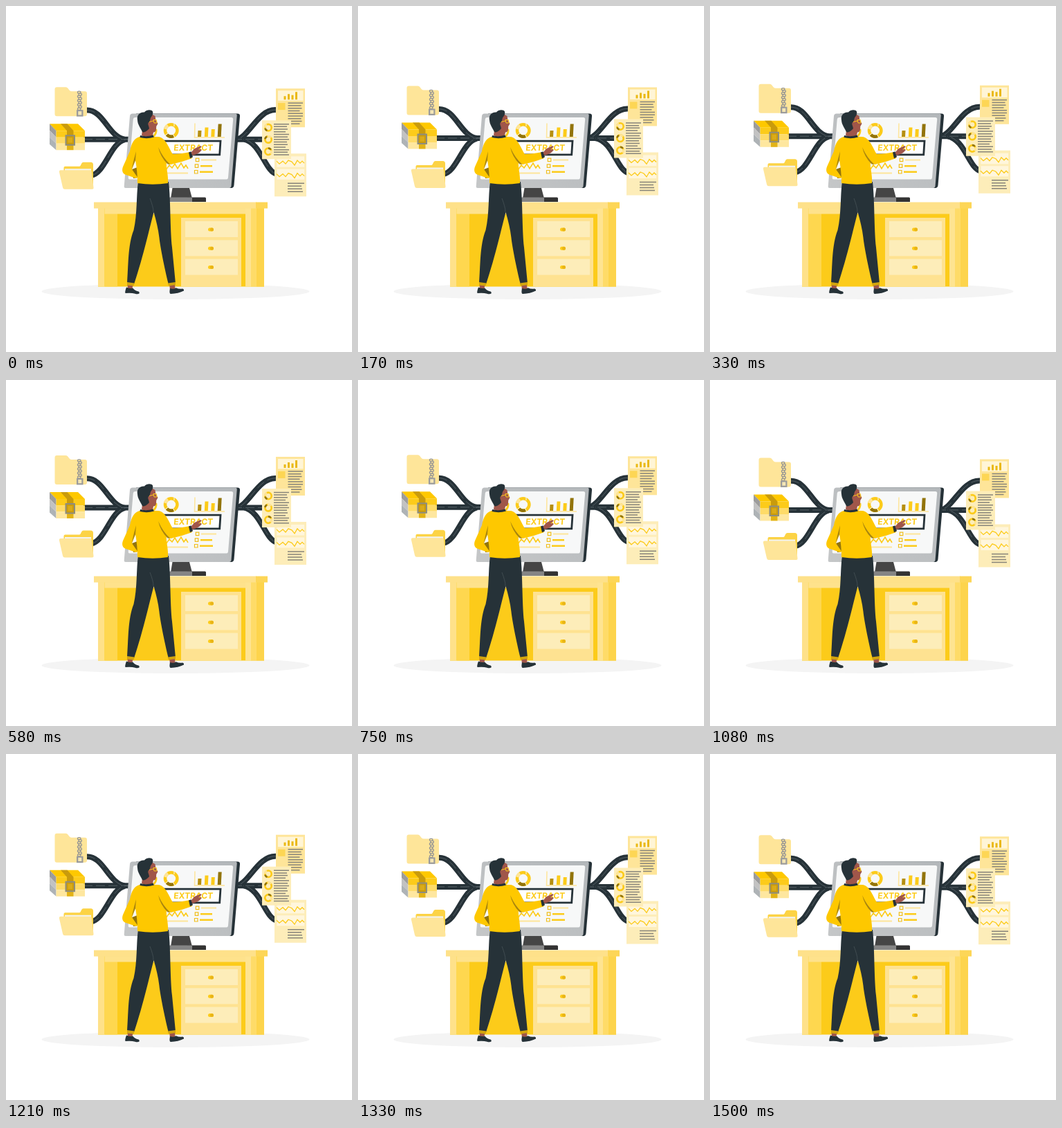
Recreate the animation shown at these times as an HTML page. Size 500x500 px, loop 1.54 s.

```html
<!DOCTYPE html>
<html lang="en">
<head>
<meta charset="utf-8">
<title>Extract</title>
<style>
html, body { margin: 0; width: 100%; height: 100%; overflow: hidden; background: #fff; }
svg { display: block; width: 100vw; height: 100vh; }
.ink { fill: #263238; }
.sun { fill: #fccb1a; }
.knit { fill: #fec800; }
.skin { fill: #a0564a; }
.pale { fill: #fee599; }
.cream { fill: #fdedb9; }
.line { fill: none; stroke: #fccb1a; stroke-width: 1.6; }
.cables { fill: none; stroke: #263238; stroke-width: 8; }
.shine { fill: none; stroke: #667177; stroke-width: .7; stroke-dasharray: 13 5; }
.text { stroke: #86847a; stroke-width: 1.5; fill: none; }
</style>
</head>
<body>
<svg viewBox="0 0 500 500">
  <defs>
    <linearGradient id="metal" x1="1" y1="0" x2="0" y2="1">
      <stop offset="0" stop-color="#b3b7ba"/><stop offset="1" stop-color="#c5c7c8"/>
    </linearGradient>
    <path id="wires" d="M116 150.500C141 149 148 190 172 192.500H180M112 192.500H180M123 244.500C143 242 151 197 172 193M390 150C364 149 351 190 333 192.500M328 192.500H372M392 243C374 240 369 197 343 192.500"/>
  </defs>

  <ellipse cx="245" cy="412.5" rx="193.5" ry="11.5" fill="#f4f4f4"/>

  <g id="float">
    <use href="#wires" class="cables"/>
    <use href="#wires" class="shine"/>

    <!-- zipped folder -->
    <path class="pale" d="M70.500 120q0-3 3-3H86c5 0 4 6 9 6h19q3 0 3 3v30q0 3-3 3H73.500q-3 0-3-3z"/>
    <g id="zip" fill="none" stroke="#949494" stroke-width="1.2"></g>
    <path fill="#9b9b9b" d="M102 150h9.500v9.500h-9.500z"/>
    <path fill="#f4e6b5" d="M104.300 152h5v5.300h-5z"/>

    <!-- parcel -->
    <path class="knit" d="M63 170h41l10 10H72.500z"/>
    <path fill="#9c9c9c" d="M63 170l9.500 10v9.500L63 179.500z"/>
    <path fill="#c2c2c2" d="M63 179.500l9.500 10v9L63 189.500z"/>
    <path fill="#aeb3b6" d="M63 189.500l9.500 9v9.500L63 199.500z"/>
    <path class="sun" d="M72.500 180H114v9.500H72.500z"/>
    <path fill="#fedb68" d="M72.500 189.500H114v9H72.500z"/>
    <path fill="#fee79f" d="M72.500 198.500H114v9.500H72.500z"/>
    <path fill="#c99b0c" d="M79 170h9.500l9 10v9.500H88V180z"/>
    <path fill="#e2b316" d="M88 189.500h9.500V208H88z"/>
    <path fill="#c99b0c" stroke="#8d8d80" stroke-width="2" d="M86.500 187h12.500v13.500H86.500z"/>
    <path fill="#dbab17" d="M89.500 190h6.500v7.500h-6.500z"/>

    <!-- open folder -->
    <path fill="#fcd345" d="M83.500 233.500q0-2 2-2H106c3 0 2-6 6-6h10.500q3.500 0 3.500 3.500V262H83.500z"/>
    <path fill="#f3f3f0" d="M85 235h38V255H85z"/>
    <path class="pale" d="M79 237H121.500q2 0 2.300 2l2.700 23q.3 2.500-2 2.500H85q-2.500 0-3-2.500l-5-22q-.5-3 2-3z"/>

    <!-- report with bars -->
    <path class="pale" d="M390 119h42v56h-42z"/>
    <path fill="#fff5d6" d="M393 122h36.500v14.500H393z"/>
    <path fill="#eab914" d="M401.500 130h3v5h-3zM407 127h3v8h-3zM412.500 128.500h3v6.500h-3zM418 124h3v11h-3z"/>
    <path fill="#fdd654" d="M393 140h10.500v10H393z"/>
    <path class="text" id="barText"/>

    <!-- report with waves -->
    <path class="cream" d="M388 213h46v62h-46z"/>
    <path fill="#fff6dc" d="M391.500 217H431v15.500h-39.500zM391.500 235.500H431v15h-39.500z"/>
    <g class="line" style="stroke-width:1.300">
      <path id="wave" d="M391 224l4 4 5-4 4 4 4-5 5 2 4 5 4-7 4 4 3-3 3 3"/>
      <use href="#wave" y="18.500"/>
    </g>
    <path class="text" id="waveText"/>

    <!-- report with rings -->
    <path class="cream" d="M370 165h42v56h-42z"/>
    <g id="rings" fill="none" stroke-width="2.700"></g>
    <path class="text" id="ringText"/>
  </g>

  <!-- monitor -->
  <path class="ink" d="M188 155.500H334.500q4 0 3.500 4L329.500 259q-.5 4-4 4H200z"/>
  <path fill="url(#metal)" d="M183 155.500H331q3 0 2.700 3L325.500 260q-.3 3-3 3H173q-2.500 0-2.300-2.500L179 159q.3-3.500 4-3.500z"/>
  <path fill="#f7f8f8" d="M187 161H325.500q3 0 2.700 3L321 248q-.2 2.500-2.500 2.500H179q-2.500 0-2.300-2.500l7-84q.3-3 3.300-3z"/>
  <path fill="#454545" d="M240.500 263H265l4 15h-31z"/>
  <path fill="#333" d="M262 276.500h25.500q1.500 0 1.500 1.500v5h-27z"/>
  <path fill="#858585" d="M235 276.500h34V283h-34z"/>

  <!-- screen contents -->
  <g fill="none" stroke-width="4.500">
    <circle cx="238.700" cy="180" r="8.700" stroke="#fccb1a"/>
    <path stroke="#92740c" d="M242 188A8.700 8.700 0 0 1 232.500 186"/>
    <path stroke="#fee599" d="M230.300 178A8.700 8.700 0 0 1 234 172.700"/>
    <path stroke="#f7f8f8" stroke-width="1" d="M243 169v5M230 187l4-3M244 190l-3-5"/>
  </g>
  <path fill="none" stroke="#fee599" stroke-width="1.500" d="M273 169.500L272.500 190H316"/>
  <path fill="#b68f10" d="M277.500 180h5l-.5 9h-5z"/>
  <path class="sun" d="M287.500 175.500h5l-.7 13.500h-5zM296.800 178h5l-.5 11h-5z"/>
  <path fill="#92740c" d="M306.700 170.500h5L310.700 189h-5z"/>
  <path fill="#fff" stroke="#263238" stroke-width="2.800" d="M229 195.200h81l-1.300 19.600H228z"/>
  <text transform="translate(242 209.200) skewX(-5)" font-family="Inter, sans-serif" font-weight="700" font-size="12" fill="#fccb1a">EXTRACT</text>
  <path class="line" d="M231 237l5-7 4 4 4-6 4 7 5-8 4 7 3-4 3 5"/>
  <path fill="none" stroke="#fee599" stroke-width="2" d="M230 241.500h33M282 222.500h22"/>
  <path fill="none" stroke="#fccb1a" stroke-width="2.500" d="M281 231.200h17M280 239.800h19"/>
  <path fill="none" stroke="#f0bd1a" stroke-width="1.200" d="M274.300 220.200h4.500v4.500h-4.500zM273.300 228.800h4.500v4.500h-4.500zM272.500 237.500h4.500v4.500h-4.500z"/>

  <!-- desk -->
  <path class="sun" d="M133 292h240v113.500H133z"/>
  <path fill="#fee18a" d="M133 292h9.500v113.500H133z"/>
  <path fill="#fed74f" d="M142.500 300H161v105.500h-18.500z"/>
  <path fill="#fee28c" d="M142.500 292H354v8.500H142.500z"/>
  <path fill="#fee291" d="M253 306h87v99.500h-87z"/>
  <path fill="#fee491" d="M346 292h8v113.500h-8z"/>
  <path fill="#fedb68" d="M354 292h8v113.500h-8z"/>
  <path fill="#fdd44c" d="M362 292h11v113.500h-11z"/>
  <path fill="#fee18a" d="M127 283.500h235v9H127z"/>
  <path fill="#fdd657" d="M361 283.500h17v9h-17z"/>
  <g id="drawers"></g>

  <!-- man -->
  <path class="skin" d="M175.500 401h8l-1 8h-6.500zM236 401h8l.5 9H237z"/>
  <path class="ink" d="M174 406.500q6 2.500 9 1 4 4.500 8.500 5 2 1 1 3-2 1.500-6 .3-5-1.600-14-.8-1-2 1.500-8.500zM237 408q5 2 8.500-.8 5 2.300 9.500 1.300 2.500.5 2 3-8 4-19 4.500-2.500 0-1-8z"/>
  <path class="ink" d="M191 254H235C238 280 237 322 240 349L245 401 235 402.500C228.500 377 222.500 345 221.500 335 220 322 217 310 213.500 298 207 322 199 360 185 402L175 400.500C177 375 176 345 184.500 324 190 300 188 275 191 254z"/>
  <path fill="none" stroke="#4b565b" stroke-width=".7" d="M208 278c3 8 5 14 5 20"/>
  <path fill="#d2a40e" d="M175 399l10.500 1.500-1 4-9.500-1zM234 400.500l11-1.500v4l-10 1.500z"/>
  <path fill="#92740c" d="M182 236l8-3 1 15-7 1z"/>
  <path class="knit" d="M195 188.500C185 190 181 199 179 210L170 230C167 236 167.500 241 172 243.500L188 249 190 247.500 182 236 187 223C189 234 190 245 190 256Q212 259.500 234 256C235 245 231 233 232 226L238 229Q253 226 269 220L266 211Q252 214 241 214C236 207 231 190 220 189z"/>
  <path fill="#a8850f" d="M187 223l1-13-3 11-3.500 15zM220 204q3 14 13.500 24.500l4 .5Q227 220 220 204z"/>
  <path class="ink" d="M264 211.500l3.500-1.200 2.500 8-4 2z"/>
  <path class="skin" d="M267.500 211.500l5-5.500 8.500-3.800q2.500 0 1 2l-4 3 4-.2q1.500 1.500-.5 2.500-2 3-6 4.500l-6 2z"/>

  <path fill="none" stroke="#fccb1a" stroke-width="3" d="M216.800 178q1 6-3.500 10"/>
  <path class="skin" d="M198 173l-2 14q8 4 16 0l1-4.500q3.500 0 4-4l.2-4.500 2.300-4-3-5-1-6-7-4-7 4z"/>
  <path class="ink" d="M194 187q9 2.500 18.500-.5l1.500 3q-10 3-20.500.5z"/>
  <path class="ink" d="M190 165C188.500 157 194 153 200 153.500 203 149.500 210.500 149.500 212 152.500 213 156 211 159 209 161.500L207.500 167 206 173 207 177Q201 184 197 182C194 175 190.500 172 190 165z"/>
  <ellipse class="skin" cx="207.300" cy="170.500" rx="2" ry="3"/>
  <path fill="none" stroke="#fccb1a" stroke-width="1" d="M207 167.500l6-1.500m0-1.500h4.500l.5 4.500h-4z"/>
</svg>
<script>
const LOOP = 1540, RISE = 9, LOW = .25, LEAD = 55;
const $ = id => document.getElementById(id);
const times = (n, make) => Array.from({ length: n }, (_, i) => make(i)).join('');

// Rows of text drawn as strokes: lengths repeat down the page.
const rows = (x, y, gap, n, lengths) =>
  times(n, i => `M${x} ${y + i * gap}h${lengths[i % lengths.length]}`);

$('barText').setAttribute('d', rows(407.5, 140, 3.75, 9, [21.5, 19, 20, 17, 21.5]));
$('waveText').setAttribute('d', rows(407, 256, 4, 4, [24, 20, 21, 22]));
$('ringText').setAttribute('d', rows(387, 170.5, 3.7, 13, [22, 19, 20, 17, 22, 20]));

$('zip').innerHTML = times(9, i =>
  `<ellipse cx="${106.4 + (i % 2 ? .7 : -.7)}" cy="${124.5 + i * 3}" rx="2.3" ry="1.6"/>`);

$('rings').innerHTML = times(3, i => `
  <g transform="translate(379 ${175.5 + i * 17.3}) rotate(${i * 80})">
    <circle r="4.7" stroke="#fccb1a"/>
    <path d="M-1.500 4.450A4.700 4.700 0 0 1-4.500 1.300" stroke="#92740c"/>
    <path d="M-4.700 0A4.700 4.700 0 0 1-2-4.300" stroke="#fee599"/>
  </g>`);

$('drawers').innerHTML = times(3, i => {
  const y = 311 + i * 27.3;
  return `<rect class="cream" x="259" y="${y}" width="76" height="23"/>
    <rect x="292" y="${y + 9.5}" width="8" height="5" rx="2.5" fill="#fccb1a"/>
    <rect x="295" y="${y + 9.5}" width="5" height="5" rx="2.5" fill="#e9b517"/>`;
});

const float = $('float');
const start = performance.now();
function draw(now) {
  const turn = (Math.max(0, now - start) % LOOP + LEAD) / LOOP * 2 * Math.PI;
  const y = LOW - RISE * (1 - Math.cos(turn)) / 2;
  float.setAttribute('transform', `translate(0 ${y.toFixed(3)})`);
  requestAnimationFrame(draw);
}
draw(start);
</script>
</body>
</html>
```
